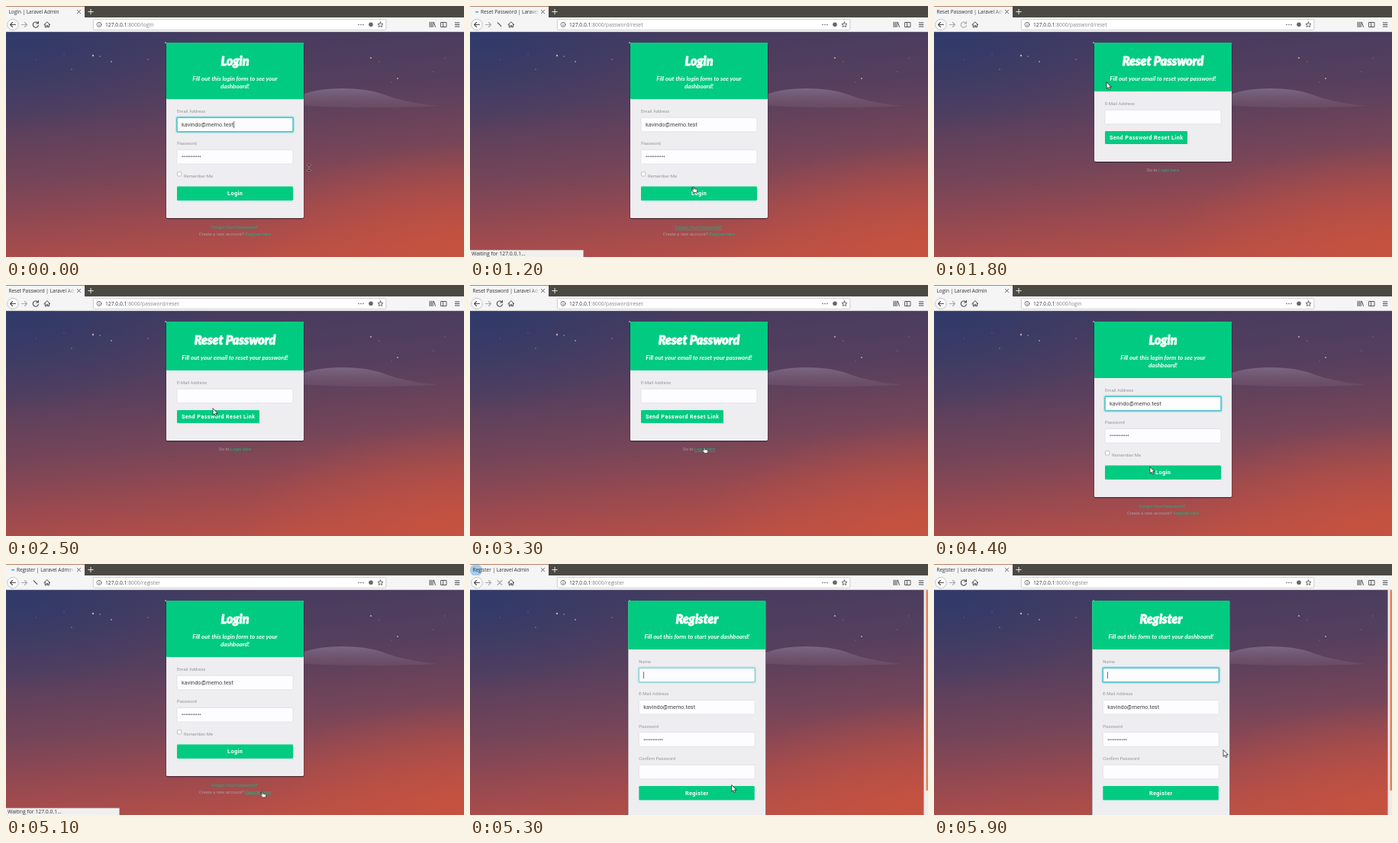
Write an HTML page that moves like this. It is 600 by 329 pixels and loops after 6000 ms.

```html
<!DOCTYPE html>
<html lang="en">
<head>
<meta charset="utf-8">
<title>Login flow</title>
<style>
html, body { margin: 0; width: 100%; height: 100%; overflow: hidden; }
svg { display: block; width: 600px; height: 329px; }
text { white-space: pre; }
.ui { font: 6.45px "Open Sans", "Noto Sans", sans-serif; fill: #333; }
.url { font-size: 6.72px; }
.title { font: italic 900 16px Lato, sans-serif; fill: #fff; stroke: #fff; stroke-width: .8; stroke-linejoin: round; }
.sub { font: italic 700 8px Lato, sans-serif; fill: #fff; }
.label { font: 5.85px Roboto, sans-serif; fill: #98979a; }
.value { font: 7.4px Roboto, sans-serif; fill: #444; }
.dots { font-size: 6.9px; }
.btn { font: 700 7.3px Roboto, sans-serif; letter-spacing: .4px; fill: #fff; }
.note { font: 5.85px Roboto, sans-serif; fill: #a89a9f; }
.link { fill: #1eb084; }
.mid { text-anchor: middle; }
.line { fill: none; stroke: #4a4a4a; stroke-linecap: round; stroke-linejoin: round; }
</style>
</head>
<body>
<svg viewBox="0 0 600 329">
  <defs>
    <linearGradient id="sky" x1=".4" y1="0" x2=".6" y2="1">
      <stop offset="0" stop-color="#453b5f"/>
      <stop offset=".3" stop-color="#563f5e"/>
      <stop offset=".58" stop-color="#774558"/>
      <stop offset=".8" stop-color="#9c4a4f"/>
      <stop offset="1" stop-color="#b84f46"/>
    </linearGradient>
    <radialGradient id="blue" cx="0" cy="0" r=".45">
      <stop offset="0" stop-color="#2c3a6c" stop-opacity=".85"/>
      <stop offset="1" stop-color="#2c3a6c" stop-opacity="0"/>
    </radialGradient>
    <radialGradient id="glow" cx="1" cy="1" r=".5">
      <stop offset="0" stop-color="#c9533e" stop-opacity=".8"/>
      <stop offset="1" stop-color="#c9533e" stop-opacity="0"/>
    </radialGradient>
    <linearGradient id="hill" x1="0" y1="0" x2="0" y2="1">
      <stop offset="0" stop-color="#7a6681"/>
      <stop offset="1" stop-color="#6f5068" stop-opacity=".6"/>
    </linearGradient>
    <linearGradient id="fade">
      <stop offset="0" stop-color="#f5f5f6" stop-opacity="0"/>
      <stop offset="1" stop-color="#f5f5f6"/>
    </linearGradient>
    <clipPath id="tabClip"><rect width="91" height="15"/></clipPath>
  </defs>

  <rect y="34" width="600" height="295" fill="url(#sky)"/>
  <rect y="34" width="600" height="295" fill="url(#blue)"/>
  <rect y="34" width="600" height="295" fill="url(#glow)"/>
  <path d="M380 119Q405 108 440 108Q472 108 492 115Q520 126 566 131Q480 136 380 130Z" fill="url(#hill)"/>
  <g id="stars" fill="#d9c6c4"></g>
  <g id="pages"></g>
  <g id="scroll">
    <rect x="594.5" y="34" width="5.5" height="295" fill="#efecea"/>
    <rect x="597.4" y="34" width="2.6" height="263" rx="1" fill="#e5825c"/>
  </g>

  <rect width="600" height="15" fill="#4b4943"/>
  <rect width="103" height="16" fill="#f5f5f6"/>
  <rect width="103" height=".8" fill="#a9613f"/>
  <rect y="15" width="600" height="19" fill="#f5f5f6"/>
  <rect y="33.5" width="600" height=".6" fill="#c5c4c4"/>
  <g clip-path="url(#tabClip)">
    <circle id="burst" cx="8" cy="8" fill="#5fa8e0"/>
    <text id="tabText" class="ui" y="10"></text>
    <rect id="spinner" y="7" width="4" height="1.4" rx=".7" fill="#36a3cf"/>
    <rect x="79" y="1" width="12" height="14" fill="url(#fade)"/>
  </g>
  <path class="line" d="M93.5 5.5l4 4m0-4l-4 4" stroke-width=".9"/>
  <path class="line" d="M107.8 7.5h6.4m-3.2-3.2v6.4" style="stroke:#e8e6e0"/>
  <circle cx="9" cy="24.5" r="7.2" fill="#fff" stroke="#aaa" stroke-width=".7"/>
  <path class="line" d="M12.5 24.5H5.5m3-3l-3 3 3 3" stroke-width="1.1"/>
  <path class="line" d="M20.5 24.5h7m-3-3l3 3-3 3" stroke-width="1.1" style="stroke:#aaa"/>
  <path id="reload" class="line" stroke-width="1.1"/>
  <path class="line" d="M49.8 24.6l4-3.8 4 3.8M51.2 24v3.8h1.8v-2.2h1.6v2.2h1.8V24"/>
  <rect x="114.4" y="17.4" width="383.4" height="14" rx="1.2" fill="#fff" stroke="#c4c4c6" stroke-width=".8"/>
  <circle class="line" cx="122" cy="24.4" r="3" stroke-width=".7"/>
  <path class="line" d="M122 24.2v1.8m0-3.4v.1" stroke-width=".8"/>
  <text class="ui url" x="130" y="26.9">127.0.0.1<tspan id="path" fill="#858585"></tspan></text>
  <path class="line" d="M462 24.4h0m3 0h0m3 0h0" stroke-width="1.5"/>
  <circle cx="478" cy="24.3" r="2.8" fill="#666"/>
  <path class="line" d="M490.5 21l1 2.3 2.5.2-1.9 1.6.6 2.4-2.2-1.3-2.2 1.3.6-2.4-1.9-1.6 2.5-.2z" stroke-width=".8"/>
  <path class="line" d="M555.2 21.2v6.4m2-6.4v6.4m2-6.4v6.4m1.4-6.2l1.8 6"/>
  <path class="line" d="M570 21.5h7v6h-7zm2.6 0v6" stroke-width=".9"/>
  <path class="line" d="M588.3 22h5.6m-5.6 2.5h5.6m-5.6 2.5h5.6"/>

  <g id="status">
    <rect x="-1" y="320" width="149.5" height="10" fill="#f1f0ef" stroke="#b9b5b2" stroke-width=".6"/>
    <text class="ui" x="2" y="327" style="font-size:6.8px">Waiting for 127.0.0.1…</text>
  </g>

  <g id="cursor" stroke-linejoin="round" stroke-linecap="round">
    <path id="arrow" d="M0 0V8.4L2 6.7 3.3 9.6 4.8 8.9 3.6 6.1H6Z" fill="#fff" stroke="#222" stroke-width=".8"/>
    <g id="beam" fill="none">
      <path d="M-1.6-3.4h3.2M0-3.4v6.8M-1.6 3.4h3.2" stroke="#fff" stroke-width="1.9" opacity=".6"/>
      <path d="M-1.6-3.4h3.2M0-3.4v6.8M-1.6 3.4h3.2" stroke="#222" stroke-width="1"/>
    </g>
    <path id="hand" d="M-.8.4Q0-.6.8.4V2.6L4 3.3Q5 3.6 4.8 4.6L4.2 7.4H.2L-2.4 4.4Q-2-3.4-.8 4Z" fill="#fff" stroke="#222" stroke-width=".7"/>
  </g>
</svg>
<script>
const $ = id => document.getElementById(id);
const LOOP = 6000, STEP = 100;
const EMAIL = 'kavindo@memo.test';
const GREEN = '#00cb81';

const rect = (x, y, w, h, attrs) => `<rect x="${x}" y="${y}" width="${w}" height="${h}" ${attrs}/>`;
const text = (cls, x, y, s) => `<text class="${cls}" x="${x}" y="${y}">${s}</text>`;
const label = (y, s) => text('label', 224, y, s);
const input = (y, value = '', cls = '') =>
  rect(224, y, 152, 18.6, 'rx="1" fill="#fdfcfe" stroke="#dedce1" stroke-width=".7"') +
  text('value ' + cls, 230, y + 12, value);
const focus = (id, y, caretX) =>
  `<g id="${id}">` +
  rect(223.4, y - .6, 153.2, 19.8, 'class="ring" rx="1.6" fill="none" stroke="#6fd3e0" stroke-width="2.6" opacity=".55"') +
  rect(224, y, 152, 18.6, 'class="ring" rx="1" fill="none" stroke="#2bb5bd" stroke-width="1"') +
  rect(caretX, y + 5, .7, 9, 'class="caret" fill="#333"') + '</g>';
const button = (y, w, h, s) =>
  rect(224, y, w, h, `rx="1.2" fill="${GREEN}"`) +
  text('btn mid', 224.2 + w / 2, y + h / 2 + 2.6, s);
const card = (bottom, head, title, subs) =>
  rect(209.6, 48.6, 180.8, bottom - 47.4, 'rx="2" fill="#1c1420" opacity=".6"') +
  rect(210, 48, 180, bottom - 48, 'rx="1.6" fill="#eeedf0"') +
  rect(210, 48, 180, head - 48, `rx="1.2" fill="${GREEN}"`) +
  text('title mid', 300, 78, title) +
  subs.map((s, i) => text('sub mid', 300, 97.6 + 10.2 * i, s)).join('');
const link = (id, s) => `<tspan class="link" id="${id}">${s}</tspan>`;

const bullets = '•'.repeat(11);
const pages = {
  login: card(278, 122, 'Login', ['Fill out this login form to see your', 'dashboard!']) +
    label(139.6, 'Email Address') + input(146.2, EMAIL) +
    label(182.2, 'Password') + input(188.4, bullets, 'dots') +
    rect(224.4, 217.6, 5.4, 5.4, 'rx=".8" fill="#fff" stroke="#a9a8ab" stroke-width=".7"') +
    text('label', 233, 224.6, 'Remember Me') +
    button(236.5, 152, 18.5, 'Login') + focus('loginFocus', 146.2, 298) +
    text('note mid', 299.5, 291.8, link('forgotLink', 'Forgot Your Password?')) +
    text('note mid', 300, 300.6, 'Create a new account? ' + link('registerLink', 'Register here')),
  reset: card(204, 112, 'Reset Password', ['Fill out your email to reset your password!']) +
    label(129.6, 'E-Mail Address') + input(136.2) +
    button(164, 108, 17, 'Send Password Reset Link') +
    text('note mid', 300, 217, 'Go to ' + link('loginLink', 'Login here')),
  register: card(345, 112, 'Register', ['Fill out this form to start your dashboard!']) +
    label(129.6, 'Name') + input(136.2) +
    label(172, 'E-Mail Address') + input(178.4, EMAIL) +
    label(214.6, 'Password') + input(220.6, bullets, 'dots') +
    label(257, 'Confirm Password') + input(263.2) +
    button(291, 151.5, 18.5, 'Register') + focus('registerFocus', 136.2, 230)
};
$('pages').innerHTML = Object.entries(pages).map(([id, body]) =>
  `<g id="${id}"${id === 'register' ? ' transform="translate(-2.7 0)"' : ''}>${body}</g>`).join('');

const stars = [[114, 65, 1.2], [209, 48, 1], [478, 68, 1.1], [513, 95, 1], [123, 66, .8], [138, 73, .9],
  [86, 83, .7], [76, 63, .5], [39, 70, .5], [186, 70, .7], [489, 73, .6], [505, 100, .5], [560, 86, .6], [575, 68, .6]];
$('stars').innerHTML = stars.map(([x, y, r]) =>
  `<circle cx="${x}" cy="${y}" r="${r}" opacity="${.35 + r * .4}"/>`).join('');

// Each navigation is timed by the moment its page is painted.
const views = [
  { at: 0, page: 'login', title: 'Login | Laravel Admin', path: ':8000/login' },
  { at: 1300, page: 'reset', title: 'Reset Password | Laravel Admin', path: ':8000/password/reset' },
  { at: 3700, page: 'login', title: 'Login | Laravel Admin', path: ':8000/login' },
  { at: 5200, page: 'register', title: 'Register | Laravel Admin', path: ':8000/register' }
];
const trail = [[0, 397, 212], [100, 397, 212], [600, 306, 298], [800, 303, 288], [1000, 303, 288], [1200, 293, 237],
  [1500, 255, 203], [1800, 226, 100], [2200, 226, 100], [2800, 316, 224], [3000, 307, 213], [3400, 307, 213],
  [3800, 254, 206], [4200, 254, 206], [4700, 336, 298.5], [5100, 336, 298.5], [5900, 379, 244], [6000, 397, 212]];
const pointers = [[0, 'beam'], [100, 'arrow'], [700, 'hand'], [1300, 'arrow'], [3000, 'hand'],
  [3700, 'beam'], [4300, 'arrow'], [4700, 'hand'], [5200, 'arrow']];
const hovers = { forgotLink: [700, 1300], loginLink: [3000, 3700], registerLink: [4700, 5200] };

const ROUND = 'M41.6 22.2A3.6 3.6 0 1 0 42.4 25.4M42.4 20.4v2.6h-2.6';
const SLASH = 'M36.2 21.8l4.6 4.6';
const CROSS = 'M36 21.5l6 6m0-6l-6 6';

const clamp = v => Math.max(0, Math.min(1, v));
const within = (t, a, b) => t >= a && t < b;
const show = (el, on) => { el.style.display = on ? '' : 'none'; };
const set = (el, attrs) => { for (const k in attrs) el.setAttribute(k, attrs[k]); };

function pointerAt(t) {
  const i = trail.findIndex(p => p[0] > t);
  const [t0, x0, y0] = trail[i - 1], [t1, x1, y1] = trail[i];
  const k = (t - t0) / (t1 - t0), e = k * k * (3 - 2 * k);
  return [x0 + (x1 - x0) * e, y0 + (y1 - y0) * e];
}

function drawFocus(id, on, ring, caret) {
  const g = $(id);
  show(g, on);
  g.querySelectorAll('.ring').forEach((r, i) => { r.style.opacity = ring * (i ? 1 : .55); });
  show(g.querySelector('.caret'), caret);
}

function draw(t) {
  const view = views.findLast(v => t >= v.at);
  const head = views.findLast(v => t >= v.at - 200);
  const next = views.find(v => v.at > t);
  const left = next ? next.at - t : Infinity;
  const age = view.at ? t - view.at : Infinity;
  const loading = left <= 300;

  for (const id in pages) show($(id), id === view.page);
  show($('scroll'), view.page === 'register');
  show($('status'), loading);

  $('tabText').textContent = head.title;
  $('path').textContent = head.path;
  set($('tabText'), { x: loading ? 14 : 3.5 });
  show($('spinner'), loading);
  set($('spinner'), { x: 7 + 3 * Math.sin((left - 100) / 90) });
  show($('burst'), age < 300);
  if (age < 300) set($('burst'), { r: 4 + age / 25, opacity: .75 - age / 450 });

  set($('reload'), { d: left <= 100 ? SLASH : age < 400 ? CROSS : ROUND });
  $('reload').style.stroke = age < 600 ? '#aaa' : '';

  const first = t < 900;
  drawFocus('loginFocus', first || within(t, 3700, 4800), first ? 1 : clamp((t - 3800) / 200),
    (first ? t : t - 3700) % 1000 < 500);
  drawFocus('registerFocus', t >= 5200, clamp((t - 5200) / 200), (t - 4900) % 1000 < 500);

  for (const id in hovers)
    $(id).style.textDecoration = within(t, ...hovers[id]) ? 'underline' : 'none';

  const kind = pointers.findLast(p => t >= p[0])[1];
  for (const id of ['arrow', 'beam', 'hand']) show($(id), id === kind);
  set($('cursor'), { transform: `translate(${pointerAt(t)})` });
}

const start = performance.now();
function tick() {
  const t = (performance.now() - start) % LOOP;
  draw(Math.floor(t / STEP) * STEP);
  requestAnimationFrame(tick);
}
tick();
</script>
</body>
</html>
```
